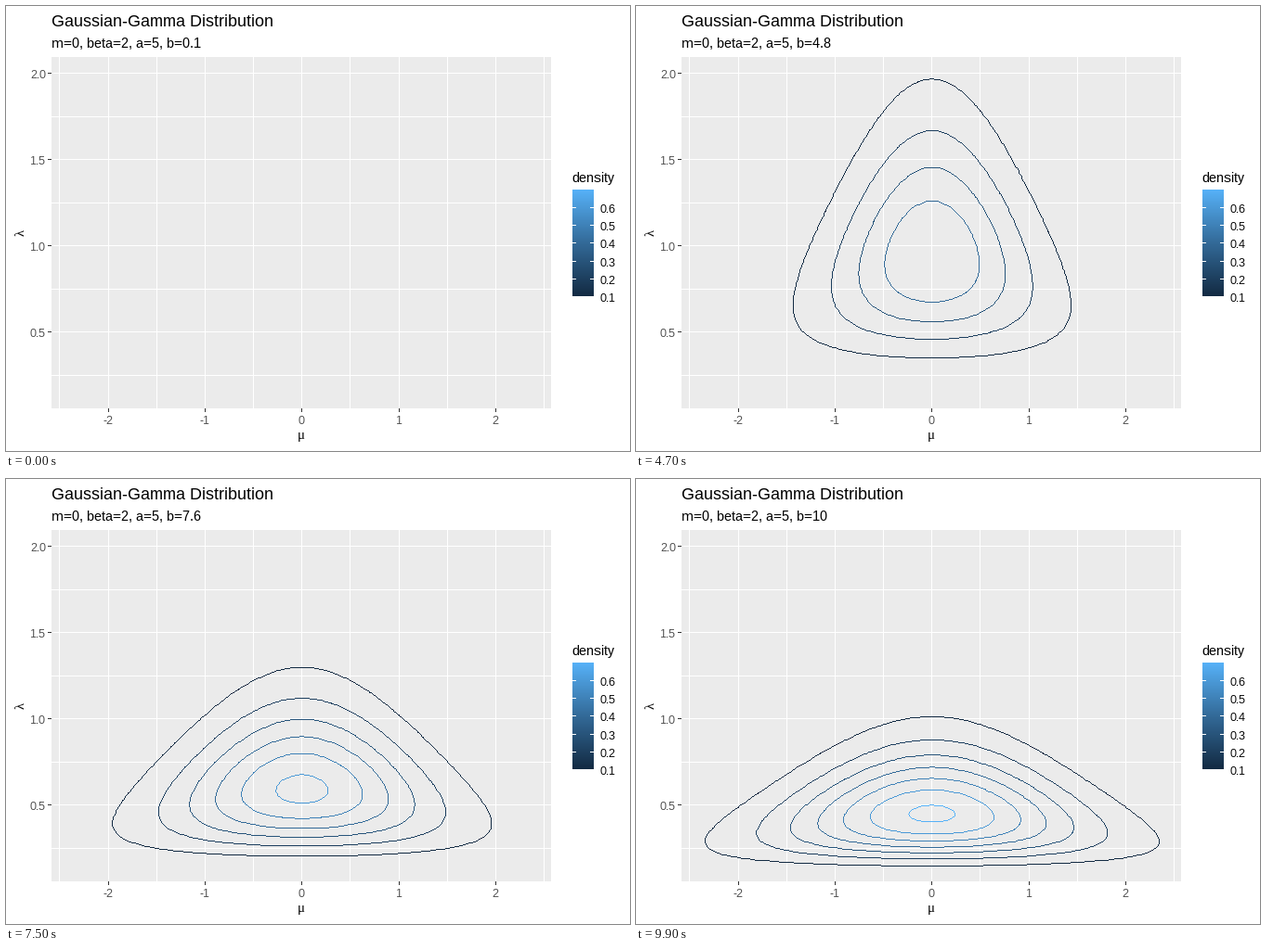
Animation of 672 by 480 pixels, one loop 10 s. Source, as a matplotlib script:

```python
import math

import matplotlib.pyplot as plt
import numpy as np
from matplotlib.animation import FuncAnimation
from matplotlib.colors import LinearSegmentedColormap, to_rgb

plt.rcParams.update({
    "font.family": "Liberation Sans",
    "text.hinting": "native",
    "text.hinting_factor": 1,
})

W, H, DPI = 672, 480, 96
LEFT, RIGHT, TOP, BOTTOM = 49, 587, 55, 434
BLUES = LinearSegmentedColormap.from_list(
    "blues", ["#132B43", "#336A98", "#56B1F7"])

M, BETA, A = 0, 2, 5
LEVELS = np.arange(1, 8) / 10

fig = plt.figure(figsize=(W / DPI, H / DPI), dpi=DPI, facecolor="white")
ax = fig.add_axes([0, 0, 1, 1])
ax.axis("off")
ax.set_xlim(0, W)
ax.set_ylim(H, 0)

backdrop = np.ones((H, W, 3))


def to_x(mu):
    return 318.3 + 104.33 * mu


def to_y(lam):
    return 72 + 186.3 * (2 - lam)


def box(x, y, w, h, color):
    backdrop[y:y + h, x:x + w] = to_rgb(color)


def label(x, y, s, px, color="black", **kw):
    kw.setdefault("va", "baseline")
    return ax.text(x, y, s, fontsize=px * 72 / DPI, color=color, **kw)


# Panel, grid and axes
box(LEFT, TOP, RIGHT - LEFT, BOTTOM - TOP, "#EBEBEB")
for mu in np.arange(-2.5, 2.6, 0.5):
    x = round(to_x(mu))
    box(x, TOP, 1, BOTTOM - TOP, "white")
    if mu == int(mu):
        box(x, BOTTOM, 1, 4, "#333333")
        label(x, 451, f"{mu:.0f}", 12, "#4D4D4D", ha="center")
for lam in np.arange(0.25, 2.1, 0.25):
    y = round(to_y(lam))
    box(LEFT, y, RIGHT - LEFT, 1, "white")
    if lam % 0.5 == 0:
        box(LEFT - 4, y, 4, 1, "#333333")
        label(43, y + 6, f"{lam:.1f}", 12, "#4D4D4D", ha="right")

label(318, 467, "μ", 15, ha="center", family="Liberation Serif")
label(16, 244, "λ", 15, ha="center", va="center", rotation=90,
      family="Liberation Serif")
label(49, 22, "Gaussian-Gamma Distribution", 18)
subtitle = label(49, 45, "", 15)

# Colour bar
label(609, 190, "density", 15)
for i in range(115):
    box(610, 198 + i, 23, 1, BLUES(1 - i / 114)[:3])
for k in range(6):
    y = round(313 - 19.17 * k)
    box(610, y, 4, 1, "white")
    box(629, y, 4, 1, "white")
    label(640, y + 6, f"0.{k + 1}", 12)

stage = fig.figimage(backdrop, origin="upper", zorder=-1)

mu = np.linspace(-3, 3, 121)
lam = np.linspace(0.01, 2, 200)
MU, LAM = np.meshgrid(mu, lam)
gauss = np.sqrt(BETA * LAM / (2 * np.pi)) * np.exp(
    -BETA * LAM * (MU - M) ** 2 / 2)


def density(b):
    gamma = b ** A / math.gamma(A) * LAM ** (A - 1) * np.exp(-b * LAM)
    return gauss * gamma


def stroke(img, pts, color):
    """Draw a hard-edged polyline, one pixel wide."""
    pts = np.floor(pts + 0.5)
    step = np.diff(pts, axis=0)
    n = np.abs(step).max(axis=1).astype(int)
    seg = np.repeat(np.arange(len(n)), n)
    t = (np.arange(n.sum()) - (np.cumsum(n) - n)[seg]) / n[seg]
    dots = np.floor(pts[seg] + step[seg] * t[:, None] + 0.5)
    x, y = np.vstack([dots, pts[-1:]]).astype(int).T
    img[y, x] = color


def update(i):
    b = round((i + 1) / 10, 1)
    subtitle.set_text(f"m={M}, beta={BETA}, a={A}, b={b:g}")
    z = density(b)
    levels = LEVELS[LEVELS < z.max()]
    img = backdrop.copy()
    if len(levels):
        cs = ax.contour(to_x(mu), to_y(lam), z, levels=levels)
        for level, segs in zip(levels, cs.allsegs):
            color = BLUES((level - LEVELS[0]) / (LEVELS[-1] - LEVELS[0]))
            for pts in segs:
                stroke(img, pts, color[:3])
        cs.remove()
    stage.set_data(img)
    return [stage, subtitle]


anim = FuncAnimation(fig, update, frames=100, interval=100, repeat=True,
                     repeat_delay=0, blit=False)
plt.show()
```
